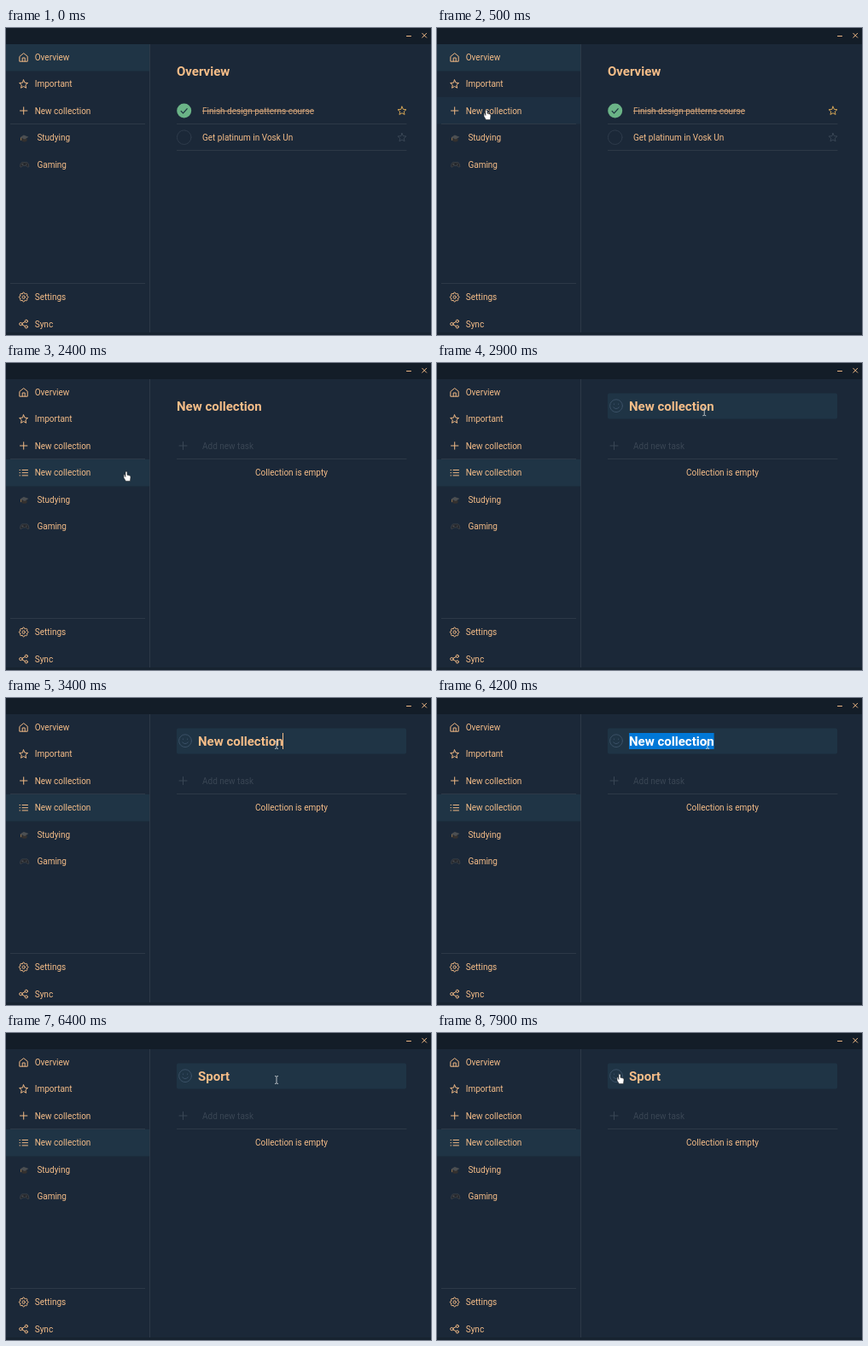
An HTML page for the animation above (8000 ms loop, 498 by 360 pixels).

```html
<!DOCTYPE html>
<html lang="en">
<head>
<meta charset="utf-8">
<title>Task collections</title>
<style>
  html, body { margin: 0; width: 100%; height: 100%; overflow: hidden; background: #1b2838; }
  svg { display: block; width: 498px; height: 360px; font: 10px Roboto, "Open Sans", sans-serif; }
  text { fill: #f5bd88; white-space: pre; }
  .title { font-size: 15px; font-weight: 700; }
  .faint { fill: #3a4654; }
  .line { stroke: #2d3947; stroke-width: 1; }
  .icon { fill: none; stroke: #f0b985; stroke-width: 1; stroke-linejoin: round; stroke-linecap: round; }
  .dim { stroke: #394655; }
  .lit { fill: #1f3445; }
</style>
</head>
<body>
<svg viewBox="0 0 498 360" xmlns="http://www.w3.org/2000/svg">
  <rect width="498" height="360" fill="#1b2838"/>
  <rect width="498" height="19" fill="#131d28"/>
  <rect y="357" width="498" height="3" fill="#172330"/>
  <path class="icon" d="M469.5 9.5h5M487.7 6.2l5 5m0-5l-5 5"/>

  <rect id="active" class="lit" width="168" height="31.5"/>
  <rect id="hover" class="lit" width="168" height="31.5"/>
  <path class="line" d="M168.5 19V357M5 112.5H163M5 299.5H163" fill="none"/>

  <path class="icon" d="M16.2 33.2L20.7 29.6L25.2 33.2V39.2H16.2ZM19.2 39V35H22.2V39"/>
  <text x="33.7" y="38">Overview</text>
  <path class="icon" data-star="20.6 65.8"/>
  <text x="33.7" y="69.3">Important</text>
  <path class="icon" d="M16.5 97h8.4M20.7 92.8v8.4"/>
  <text x="33.7" y="100.7">New collection</text>

  <g id="fresh">
    <path class="icon" d="M19 125.5h6.5M19 128.7h6.5M19 131.9h6.5M16 125.5h.6M16 128.7h.6M16 131.9h.6"/>
    <text x="33.7" y="132.4">New collection</text>
  </g>

  <g id="list">
    <path d="M18.5 129.5v3q3 1.8 6 0v-3z" fill="#34312f"/>
    <path d="M16.5 128.2l4.3-2.6 5.6 2.1-4.4 2.9z" fill="#4c4f52"/>
    <path d="M17.6 128.6v3.2" stroke="#b58b55" stroke-width=".8"/>
    <text x="36.4" y="132.4">Studying</text>
    <path d="M18.5 157.5h6.4q2 1.5 2 5.2-1.5 1.6-3-1.2h-4.4q-1.5 2.8-3 1.2 0-3.7 2-5.2z" fill="#25272c" stroke="#444950" stroke-width=".7"/>
    <path d="M18.5 159.8h1.8M23.4 159.8h1" stroke="#70767c" stroke-width=".8"/>
    <text x="36.4" y="163.8">Gaming</text>
  </g>

  <path class="icon" id="gear"/>
  <circle class="icon" cx="20.7" cy="315.6" r="1.7"/>
  <text x="33.7" y="319.1">Settings</text>
  <path class="icon" d="M19.1 346.2l3.2-1.7M19.1 348l3.2 1.7"/>
  <g class="icon">
    <circle cx="17.4" cy="347.1" r="1.7"/>
    <circle cx="23.8" cy="343.8" r="1.6"/>
    <circle cx="23.8" cy="350.4" r="1.6"/>
  </g>
  <text x="33.7" y="350.6">Sync</text>

  <g id="overview">
    <text class="title" x="200" y="55.6">Overview</text>
    <circle cx="208.7" cy="97" r="8.5" fill="#6bb487"/>
    <path d="M204.8 97.2l2.7 2.7 5-5.5" fill="none" stroke="#1d3340" stroke-width="1.2"/>
    <text x="230" y="100.6" style="fill:#d5a57a">Finish design patterns course</text>
    <path d="M230 97.3H361" stroke="#d5a57a"/>
    <path class="icon" data-star="464 97" style="stroke:#d3a455"/>
    <circle class="icon dim" cx="208.7" cy="128.2" r="8.3" style="stroke:#2e3b4b"/>
    <text x="230" y="131.9">Get platinum in Vosk Un</text>
    <path class="icon dim" data-star="464 128.3"/>
    <path class="line" d="M200 112.5H469.5M200 143.5H469.5"/>
  </g>

  <g id="collection">
    <rect id="bar" x="200" y="35.5" width="269" height="30" rx="2" class="lit"/>
    <g id="smile" class="icon" style="stroke:#3a5066">
      <circle cx="210" cy="50.2" r="7.4"/>
      <path d="M207.4 48v.5M212.6 48v.5M206.7 52q3.3 3.4 6.6 0"/>
    </g>
    <rect id="mark" x="225" y="41" height="19" fill="#0078d7"/>
    <text id="name" class="title" y="55.6"></text>
    <rect id="caret" y="41" width="1" height="19" fill="#f5bd88"/>
    <path class="icon dim" d="M203 97h9M207.5 92.5v9"/>
    <text class="faint" x="230" y="100.6">Add new task</text>
    <path class="line" d="M200 112.5H469.5"/>
    <text x="334.5" y="131.9" text-anchor="middle">Collection is empty</text>
  </g>

  <g id="cursor">
    <path id="arrow" d="M0 0V11L2.6 8.6 4.4 12.4 6 11.7 4.3 8H7.7Z" fill="#fff" stroke="#111" stroke-width=".6"/>
    <path id="hand" d="M-1 .8Q0-.6 1 .8V4.3L4 5Q5.2 5.4 5 7L4.4 11.6H-.6L-3 7.4Q-3-.2 -1 6.6Z" fill="#fff" stroke="#222" stroke-width=".5"/>
    <path id="beam" d="M-2-4.5Q0-4.5 0-3.5Q0-4.5 2-4.5M0-3.5V3.5M-2 4.5Q0 4.5 0 3.5Q0 4.5 2 4.5" fill="none" stroke="#c9cdd1" stroke-width=".9"/>
  </g>
</svg>
<script>
const LOOP = 8000, STEP = 100;
const $ = id => document.getElementById(id);
const show = (id, on) => { $(id).style.display = on ? "" : "none"; };
const set = (id, attr, value) => $(id).setAttribute(attr, value);
const clamp = v => Math.max(0, Math.min(1, v));

// Closed outline whose corners alternate between two radii.
function spikes(cx, cy, radii, count) {
  const pts = [];
  for (let i = 0; i < count; i++) {
    const a = -Math.PI / 2 + i * 2 * Math.PI / count;
    const r = radii[i % radii.length];
    pts.push((cx + r * Math.cos(a)).toFixed(2) + " " + (cy + r * Math.sin(a)).toFixed(2));
  }
  return "M" + pts.join("L") + "Z";
}
document.querySelectorAll("[data-star]").forEach(el => {
  const [x, y] = el.dataset.star.split(" ").map(Number);
  el.setAttribute("d", spikes(x, y + .3, [5.2, 2.4], 10));
});
set("gear", "d", spikes(20.7, 315.6, [5.4, 5, 3.9, 5], 32));

// time, x, y
const path = [
  [100, 343, 299], [300, 165, 185], [500, 58, 96], [1000, 58, 96],
  [1400, 44, 127], [1800, 62, 127], [2000, 62, 127], [2400, 141, 127],
  [2800, 312, 58], [3200, 317, 55], [6800, 317, 55], [7100, 270, 61],
  [7400, 222, 48], [7700, 222, 48], [7900, 214, 48], [8000, 214, 48]
];
function pointer(t) {
  const i = Math.max(1, path.findIndex(p => p[0] >= t));
  const [a, b] = [path[i - 1], path[i]];
  const k = clamp((t - a[0]) / (b[0] - a[0]));
  return [a[1] + (b[1] - a[1]) * k, a[2] + (b[2] - a[2]) * k];
}

const typing = [[0, "New collection"], [4600, "S"], [5000, "Sp"], [5200, "Spo"], [5500, "Spor"], [5700, "Sport"]];

function draw(t) {
  const added = t >= 1000, opened = t >= 2000, editing = t >= 2700;
  const marked = t >= 3700 && t < 4600;

  set("active", "y", opened ? 113 : 19);
  const onAdd = t < 1200;
  set("hover", "y", onAdd ? 81 : 113);
  set("hover", "opacity", opened ? 0 :
    onAdd ? clamp((t - 300) / 300) * clamp((1200 - t) / 200) : clamp((t - 1100) / 300));
  show("fresh", added);
  set("list", "transform", `translate(0 ${added ? 31.4 : 0})`);

  show("overview", !opened);
  show("collection", opened);
  show("bar", editing);
  show("smile", editing);
  const name = $("name"), x = editing ? 225 : 200;
  name.textContent = typing.filter(s => s[0] <= t).pop()[1];
  name.setAttribute("x", x);
  name.style.fill = marked ? "#fff" : "";
  const width = opened ? name.getComputedTextLength() : 0;
  show("mark", marked);
  set("mark", "width", width);
  show("caret", t >= 3100 && t < 5800 && !marked);
  set("caret", "x", Math.round(x + width - .5));

  const [px, py] = pointer(t);
  const onTitle = opened && py > 36 && py < 65 && px > 200;
  const hand = px < 169 || (onTitle && px < 225);
  show("cursor", t >= 100);
  set("cursor", "transform", `translate(${px} ${py})`);
  show("hand", hand);
  show("beam", onTitle && !hand);
  show("arrow", !onTitle && !hand);
}

function tick() {
  draw(Math.floor(performance.now() % LOOP / STEP) * STEP);
  requestAnimationFrame(tick);
}
tick();
</script>
</body>
</html>
```
